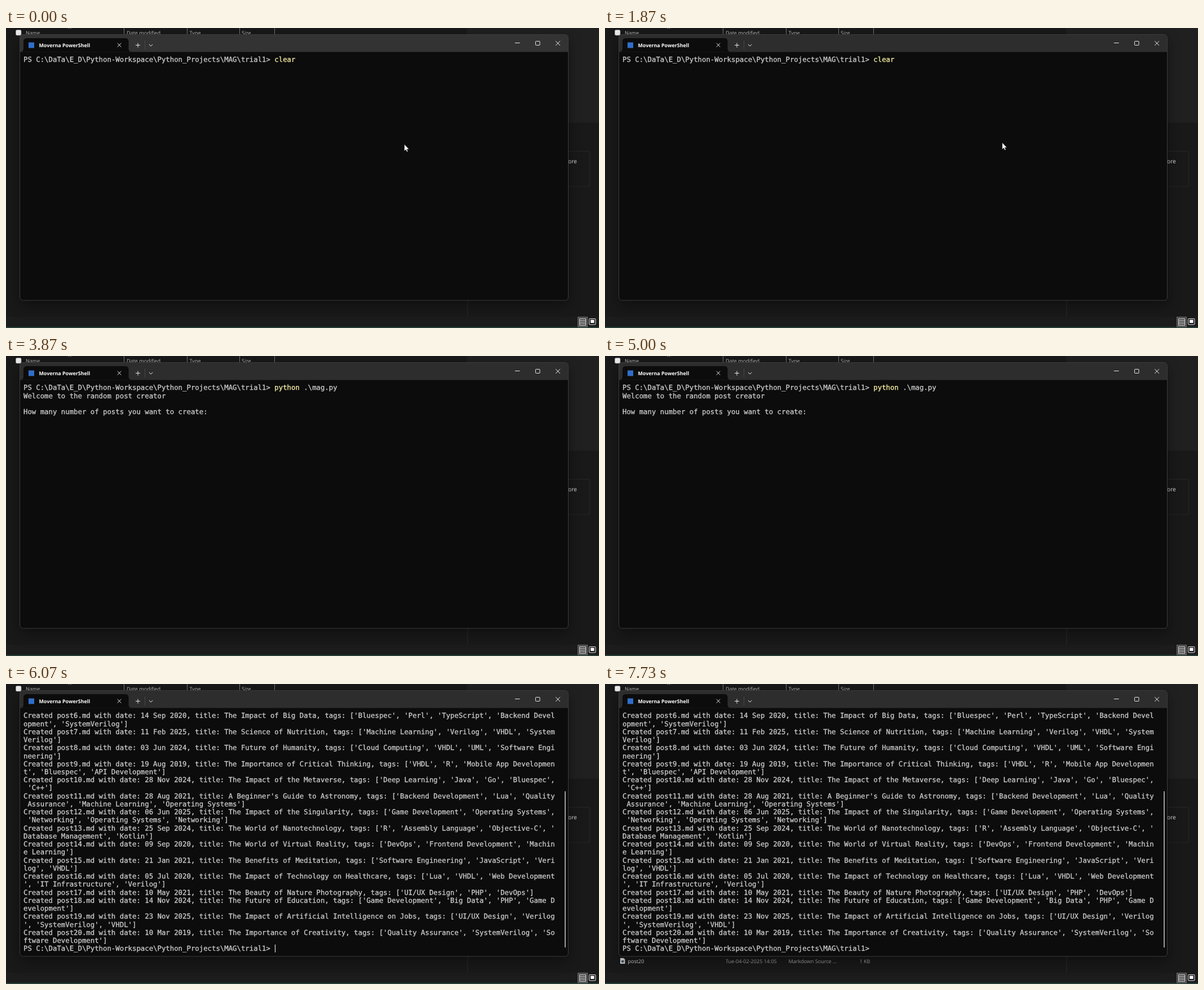
Write an HTML page that moves like this. It is 1052 px wide and 532 px high and loops after 8 s.

```html
<!DOCTYPE html>
<html lang="en">
<head>
<meta charset="utf-8">
<title>Terminal post creator</title>
<style>
  html, body { margin: 0; width: 100%; height: 100%; overflow: hidden; background: #191919; }
  svg { display: block; width: 1052px; height: 532px; }
  text { white-space: pre; text-rendering: geometricPrecision; }
  .ui text { font: 9.05px "Open Sans", "Noto Sans", sans-serif; fill: #c8c8c8; }
  .ui .tab-title { font-size: 8.9px; font-weight: 700; fill: #fff; }
  .ui .file { fill: #e4e4e4; }
  .ui .dim { fill: #a8a8a8; }
  .term text { font: 12.348px "DejaVu Sans Mono", monospace; fill: #ccc; stroke: #ccc; stroke-width: .3; }
  .term .cmd { fill: #f9f1a5; stroke: #f9f1a5; }
  .line { fill: none; stroke: #e8e8e8; stroke-width: 1; }
  .win { filter: drop-shadow(0 8px 12px rgba(0, 0, 0, .42)); }
</style>
</head>
<body>
<svg viewBox="0 0 1052 532">
  <g class="ui">
    <rect width="1052" height="532" fill="#191919"/>
    <rect x="818" width="234" height="168" fill="#202020"/>
    <rect x="818" y="168" width="2" height="344" fill="#222"/>
    <rect y="512" width="1052" height="18" fill="#1c1c1c"/>
    <rect y="530" width="1052" height="2" fill="#263f38"/>

    <rect x="17.5" y="3.5" width="9.5" height="9.5" rx="2" fill="#eee" stroke="#999" stroke-width=".6"/>
    <path class="line" d="M110.5 1.5 113-.8 115.5 1.5" style="stroke:#888"/>
    <path class="line" d="M209.5 0V12M321.5 0V12M414.5 0V12M476.5 0V12" style="stroke:#777"/>
    <text x="35" y="11.5">Name</text>
    <text x="214" y="11.5">Date modified</text>
    <text x="325.5" y="11.5">Type</text>
    <text x="418" y="11.5">Size</text>

    <rect x="900.5" y="218.5" width="135" height="62.5" rx="2" fill="none" stroke="#272727"/>
    <text x="997" y="240" style="font-size:10.2px;fill:#e4e4e4">ore</text>
    <rect x="996" y="247.5" width="2" height="1" fill="#aaa"/>

    <g id="file">
      <path d="M27 486H33L35.5 488.5V496H27Z" fill="#d4d8dc"/>
      <rect x="29" y="490" width="4.5" height="4" fill="#4c5960"/>
      <text class="file" x="40.5" y="494.8">post20</text>
      <text class="dim" x="214" y="494.8">Tue-04-02-2025 14:05</text>
      <text class="dim" x="325.5" y="494.8">Markdown Source ...</text>
      <text class="dim" x="451.5" y="494.8">1 KB</text>
    </g>

    <rect x="1014.5" y="512.5" width="17" height="17.5" fill="#4a4a4a" stroke="#686868"/>
    <path class="line" d="M1017.5 515.5H1028.5V527.5H1017.5ZM1018 518.5H1028M1018 521.5H1028M1018 524.5H1028" style="stroke:#d0d0d0"/>
    <rect class="line" x="1034.5" y="515.5" width="11.5" height="10.5" rx="1"/>
    <rect x="1037" y="517.5" width="6.5" height="5.5" fill="#fff"/>

    <g class="win">
      <rect x="24.5" y="11.5" width="973" height="471.5" rx="6" fill="#0c0c0c"/>
    </g>
    <path id="bar" d="M24.5 42.5V17.5Q24.5 11.5 30.5 11.5H991.5Q997.5 11.5 997.5 17.5V42.5Z"/>
    <rect x="24.5" y="11.5" width="973" height="471.5" rx="6" fill="none" stroke="#3b3b3b"/>
    <path d="M25 42.5Q31 42.5 31 36.5V24Q31 18 37 18H211.5Q217.5 18 217.5 24V36.5Q217.5 42.5 223.5 42.5Z" fill="#0c0c0c"/>
    <rect x="40" y="25.5" width="10" height="10" fill="#2f6fc9"/>
    <text class="tab-title" x="58.5" y="33.8">Moverna PowerShell</text>
    <path class="line" d="M197.7 27 204.3 33.6M204.3 27 197.7 33.6"/>
    <path class="line" d="M230 30.5H238M234 26.5V34.5"/>
    <path class="line" d="M246.5 22V38" style="stroke:#484848"/>
    <path class="line" d="M253.8 29 257 32.2 260.2 29"/>
    <path class="line" d="M903 26.5H911.5"/>
    <rect class="line" x="939.5" y="23.5" width="7.5" height="7" rx=".8"/>
    <path class="line" d="M975.2 23.2 983 31M983 23.2 975.2 31"/>
  </g>

  <g class="term" id="term">
    <rect id="scroll" x="991" y="190" width="2" height="277.5" rx="1" fill="#9c9c9c"/>
    <rect id="caret" width="1" height="14" fill="#fff"/>
  </g>
  <path id="mouse" d="M0 0V12L2.7 9.4 4.6 13.4 6.4 12.5 4.6 8.7H8.3Z" fill="#fff" stroke="#000" stroke-width=".5"/>
</svg>

<script>
const LOOP = 8000, COLS = 127;
const LEFT = 31, TOP = 49.1, CELL_W = 7.434, CELL_H = 14.24, BASE = 11.2;
const PROMPT = "PS C:\\DaTa\\E_D\\Python-Workspace\\Python_Projects\\MAG\\trial1> ";
const QUESTION = "How many number of posts you want to create: ";

// date, title, tags; numbering starts at post 6
const POSTS = [
  ["14 Sep 2020", "The Impact of Big Data", "Bluespec|Perl|TypeScript|Backend Development|SystemVerilog"],
  ["11 Feb 2025", "The Science of Nutrition", "Machine Learning|Verilog|VHDL|SystemVerilog"],
  ["03 Jun 2024", "The Future of Humanity", "Cloud Computing|VHDL|UML|Software Engineering"],
  ["19 Aug 2019", "The Importance of Critical Thinking", "VHDL|R|Mobile App Development|Bluespec|API Development"],
  ["28 Nov 2024", "The Impact of the Metaverse", "Deep Learning|Java|Go|Bluespec|C++"],
  ["28 Aug 2021", "A Beginner's Guide to Astronomy", "Backend Development|Lua|Quality Assurance|Machine Learning|Operating Systems"],
  ["06 Jun 2025", "The Impact of the Singularity", "Game Development|Operating Systems|Networking|Operating Systems|Networking"],
  ["25 Sep 2024", "The World of Nanotechnology", "R|Assembly Language|Objective-C|Database Management|Kotlin"],
  ["09 Sep 2020", "The World of Virtual Reality", "DevOps|Frontend Development|Machine Learning"],
  ["21 Jan 2021", "The Benefits of Meditation", "Software Engineering|JavaScript|Verilog|VHDL"],
  ["05 Jul 2020", "The Impact of Technology on Healthcare", "Lua|VHDL|Web Development|IT Infrastructure|Verilog"],
  ["10 May 2021", "The Beauty of Nature Photography", "UI/UX Design|PHP|DevOps"],
  ["14 Nov 2024", "The Future of Education", "Game Development|Big Data|PHP|Game Development"],
  ["23 Nov 2025", "The Impact of Artificial Intelligence on Jobs", "UI/UX Design|Verilog|SystemVerilog|VHDL"],
  ["10 Mar 2019", "The Importance of Creativity", "Quality Assurance|SystemVerilog|Software Development"]
];

// Each step changes only the listed parts of the state. caret: [column, row]
const STEPS = [
  [0, { screen: "clear", answer: "", caret: null, mouse: [706.7, 206.3], bar: "#333333", file: false }],
  [70, { mouse: [706, 205.2], bar: "#313131" }],
  [130, { mouse: [705.3, 204.2], bar: "#2f2f2f" }],
  [200, { mouse: [704.7, 203.3], bar: "#2d2d2d", caret: [65, 0] }],
  [800, { caret: null }],
  [1330, { caret: [65, 0] }],
  [1870, { caret: null }],
  [2470, { screen: "run" }],
  [2530, { caret: [75, 0] }],
  [3200, { caret: [0, 1], mouse: null }],
  [3270, { screen: "ask", caret: [45, 3] }],
  [3870, { caret: null }],
  [4400, { caret: [45, 3] }],
  [5000, { caret: null }],
  [5130, { answer: "2", caret: [46, 3] }],
  [5400, { answer: "20", caret: [47, 3] }],
  [6070, { screen: "done", caret: [60, 29] }],
  [6670, { caret: null }],
  [7200, { caret: [60, 29] }],
  [7670, { file: true }],
  [7730, { caret: null }]
];

const $ = id => document.getElementById(id);
const svgNode = tag => document.createElementNS("http://www.w3.org/2000/svg", tag);
const show = (node, on) => { node.style.display = on ? "" : "none"; };

function addRow(group, row, ...parts) {
  const text = svgNode("text");
  text.setAttribute("x", LEFT);
  text.setAttribute("y", TOP + row * CELL_H + BASE);
  for (const [string, cls] of parts) {
    const span = svgNode("tspan");
    span.textContent = string;
    if (cls) span.setAttribute("class", cls);
    text.append(span);
  }
  group.append(text);
  return text;
}

function addScreen() {
  const group = svgNode("g");
  $("term").prepend(group);
  return group;
}

const screens = { clear: addScreen(), run: addScreen(), ask: addScreen(), done: addScreen() };
const runLine = [[PROMPT], ["python", "cmd"], [" .\\mag.py"]];

addRow(screens.clear, 0, [PROMPT], ["clear", "cmd"]);
addRow(screens.run, 0, ...runLine);
addRow(screens.ask, 0, ...runLine);
addRow(screens.ask, 1, ["Welcome to the random post creator"]);
const answer = addRow(screens.ask, 3, [QUESTION], [""]).lastChild;

let row = 0;
POSTS.forEach(([date, title, tags], i) => {
  const list = tags.split("|").map(tag => `'${tag}'`).join(", ");
  const line = `Created post${i + 6}.md with date: ${date}, title: ${title}, tags: [${list}]`;
  for (let at = 0; at < line.length; at += COLS) {
    addRow(screens.done, row++, [line.slice(at, at + COLS)]);
  }
});
addRow(screens.done, row, [PROMPT]);

function stateAt(time) {
  return Object.assign({}, ...STEPS.filter(([at]) => at <= time).map(([, change]) => change));
}

function draw(time) {
  const state = stateAt(time);
  for (const name in screens) show(screens[name], name === state.screen);
  answer.textContent = state.answer;
  $("bar").setAttribute("fill", state.bar);
  show($("scroll"), state.screen === "done");
  show($("file"), state.file);
  show($("caret"), state.caret);
  if (state.caret) {
    $("caret").setAttribute("x", Math.round(LEFT + state.caret[0] * CELL_W));
    $("caret").setAttribute("y", Math.floor(TOP + state.caret[1] * CELL_H));
  }
  show($("mouse"), state.mouse);
  if (state.mouse) $("mouse").setAttribute("transform", `translate(${state.mouse})`);
}

const start = performance.now();
function tick() {
  draw((performance.now() - start) % LOOP);
  requestAnimationFrame(tick);
}
tick();
</script>
</body>
</html>
```
